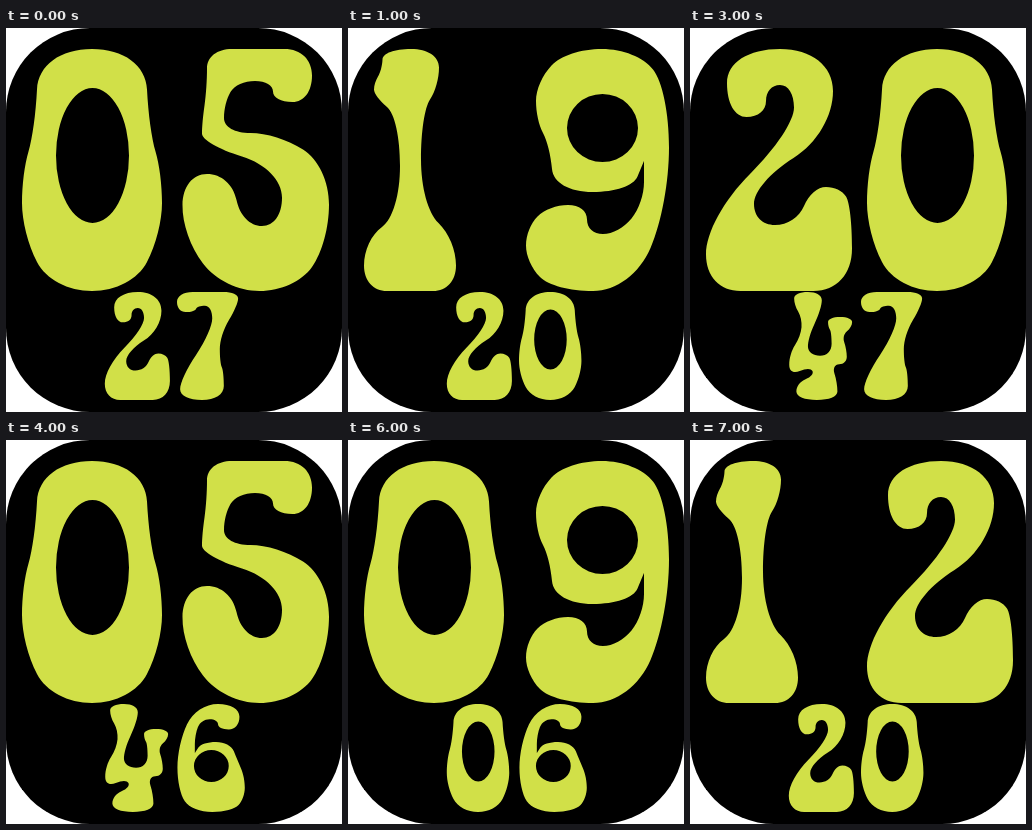
These frames come from a looping animation (336x384 px, 8000 ms). An HTML page:

```html
<!DOCTYPE html>
<html lang="en">
<head>
<meta charset="utf-8">
<title>Clock</title>
<style>
  html, body { margin: 0; width: 100%; height: 100%; overflow: hidden; background: #fff; }
  svg { display: block; width: 336px; height: 384px; }
</style>
</head>
<body>
<svg viewBox="0 0 336 384">
  <rect width="336" height="384" rx="84"/>
  <g id="digits" fill="#d1e048" fill-rule="evenodd"></g>
</svg>
<script>
const ROUND = 0.6;
const mix = (a, b, t) => [a[0] + (b[0] - a[0]) * t, a[1] + (b[1] - a[1]) * t];

// Closed soft outline that touches the middle of every side of a polygon.
// A corner given twice stays sharp.
function blob(...coords) {
  const corners = [];
  for (let i = 0; i < coords.length; i += 2) corners.push([coords[i], coords[i + 1]]);
  const n = corners.length;
  return corners.map((corner, i) => {
    const from = mix(corners[(i + n - 1) % n], corner, 0.5);
    const to = mix(corner, corners[(i + 1) % n], 0.5);
    return `${i ? 'L' : 'M'}${from}C${mix(from, corner, ROUND)} ${mix(to, corner, ROUND)} ${to}`;
  }).join('') + 'Z';
}

// Adds the left half of a shape given its right half from top to bottom.
function mirrored(axis, ...half) {
  const all = [...half];
  for (let i = half.length - 2; i >= 0; i -= 2) all.push(2 * axis - half[i], half[i + 1]);
  return blob(...all);
}

const hole = (cx, cy, rx, ry) =>
  `M${cx - rx} ${cy}a${rx} ${ry} 0 1 0 ${2 * rx} 0a${rx} ${ry} 0 1 0 ${-2 * rx} 0Z`;

const hook = [104, 57, 76, 57, 76, 89, 37, 89, 37, 21, 143, 21];
const tail = [16, 146, 64, 146, 75, 198, 115, 198, 115, 141];

const zero = mirrored(86, 139, 21, 143, 102, 156, 145, 156, 205, 126, 263) + hole(86.5, 127.5, 36.5, 67.5);

const one = blob(91, 21, 91, 58, 73, 85, 73, 178, 108, 212, 108, 263, 62, 263,
  16, 263, 16, 212, 52, 186, 52, 90, 26, 68, 26, 55, 34, 42, 35, 21);

const two = blob(...hook, 143, 105, 64, 155, 64, 197, 106, 197, 122, 159, 150, 159,
  162, 178, 162, 263, 85, 263, 16, 263, 16, 190, 104, 102);

const three = blob(...hook, 143, 100, 118, 112, 159, 130, 159, 263, 17, 263,
  ...tail, 68, 136, 68, 116, 104, 104);

const four = blob(28, 21, 90, 21, 90, 58, 58, 125, 60, 164, 112, 164, 112, 110, 104, 100,
  104, 77, 158, 77, 158, 100, 135, 118, 146, 150, 146, 182, 112, 184, 125, 225, 125, 263,
  33, 263, 33, 225, 74, 208, 64, 188, 17, 208, 17, 160, 43, 120, 46, 80, 28, 50);

const five = blob(40, 21, 90, 21, 145, 21, 145, 74, 106, 74, 106, 53, 70, 53, 57, 75,
  57, 105, 110, 105, 162, 138, 162, 215, 128, 263, 57, 263, 15, 208,
  ...tail, 35, 116, 35, 95, 40, 60);

const six = blob(156, 21, 156, 78, 108, 78, 108, 55, 70, 55, 56, 90, 56, 131, 56, 131,
  72, 106, 135, 106, 152, 148, 168, 185, 168, 232, 140, 263, 50, 263, 17, 215,
  17, 112, 60, 21) + hole(93, 160, 39, 36);

const seven = blob(16, 21, 87, 21, 153, 21, 153, 50, 112, 118, 112, 180, 121, 200,
  121, 263, 23, 263, 23, 215, 95, 108, 95, 52, 62, 52, 55, 66, 16, 66);

const nine = blob(58, 21, 128, 21, 160, 62, 160, 177, 123, 263, 45, 263, 17, 235, 17, 200,
  40, 177, 78, 177, 78, 206, 110, 206, 135, 175, 135, 133, 135, 133, 122, 164, 45, 164,
  41, 118, 27, 92, 27, 54) + hole(93.5, 100, 35.5, 34);

const glyphs = [zero, one, two, three, four, five, six, seven, '', nine];
const times = ['0527', '1920', '0237', '2047', '0546', '1539', '0906', '1220'];
const STEP = 1000;

const small = x => `translate(${x} 264) scale(.446) translate(-16 -21)`;
const slots = ['', 'translate(161)', small(98.8), small(171)].map(transform => {
  const path = document.createElementNS('http://www.w3.org/2000/svg', 'path');
  path.setAttribute('transform', transform);
  return document.getElementById('digits').appendChild(path);
});

let shown;
function draw() {
  const time = times[Math.floor(performance.now() / STEP) % times.length];
  if (time !== shown) {
    shown = time;
    slots.forEach((path, i) => path.setAttribute('d', glyphs[time[i]]));
  }
  requestAnimationFrame(draw);
}
draw();
</script>
</body>
</html>
```
